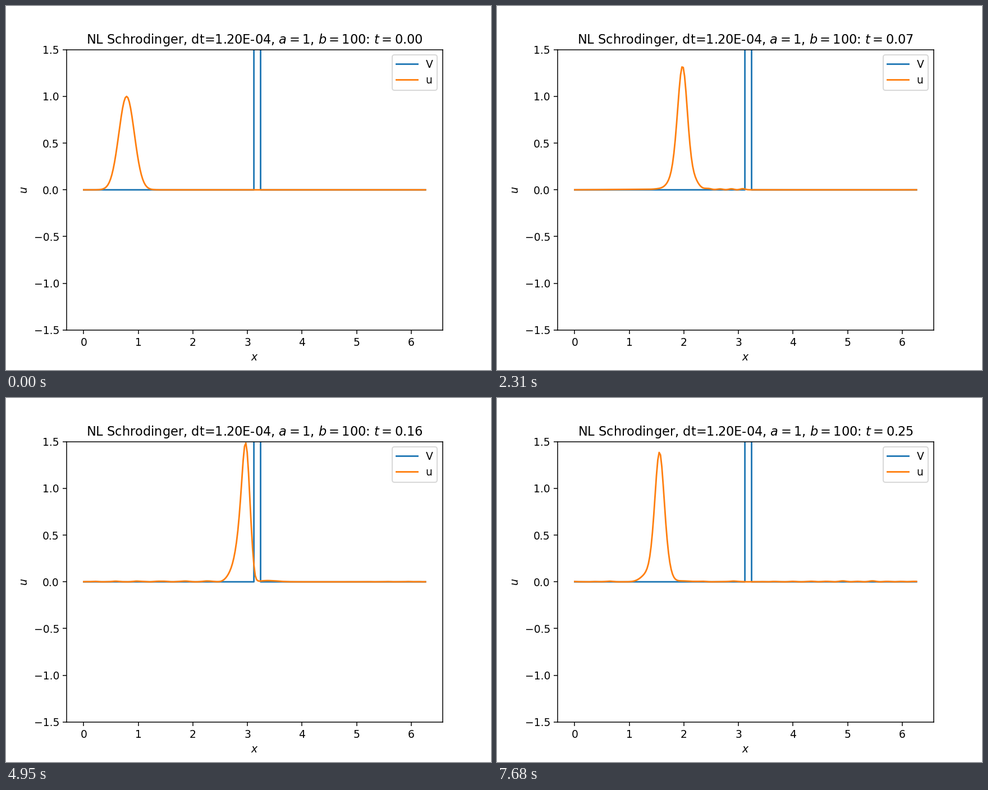
These frames come from a looping animation (864 px wide and 648 px high, 7710 ms). A matplotlib script:

```python
import numpy as np
import matplotlib.pyplot as plt
from matplotlib.animation import FuncAnimation

FRAMES, INTERVAL, STEPS = 257, 30, 8

# Focusing NLS on a periodic grid: i u_t + a u_xx + b |u|^2 u - V u = 0
N = 256
A, B = 1, 100
DX = 2 * np.pi / N
DT = 0.2 * DX**2
x = np.arange(N) * DX
k = np.fft.fftfreq(N, 1 / N)

V = np.zeros(N)
V[N // 2:N // 2 + 4] = 500


def solve():
    """Strang splitting; returns |u|^2 for every frame."""
    drift = np.exp(-1j * A * k**2 * DT)

    def kick(u):
        return u * np.exp(0.5j * DT * (B * abs(u)**2 - V))

    u = np.exp(-(x - np.pi / 4)**2 / (2 * 0.2**2) + 8j * x)
    out = [abs(u)**2]
    for _ in range(FRAMES - 1):
        for _ in range(STEPS):
            u = kick(np.fft.ifft(drift * np.fft.fft(kick(u))))
        out.append(abs(u)**2)
    return out


density = solve()

fig, ax = plt.subplots(figsize=(6.4, 4.8), dpi=135)
ax.plot(x, V, label="V")
wave, = ax.plot(x, density[0], label="u")
ax.set_ylim(-1.5, 1.5)
ax.set_xlabel("$x$")
ax.set_ylabel("$u$")
ax.legend(loc="upper right")
title = ax.set_title("")


def update(i):
    t = i * STEPS * DT
    wave.set_ydata(density[i])
    title.set_text(f"NL Schrodinger, dt={DT:.2E}, $a={A}$, $b={B}$: $t={t:.2f}$")
    return wave, title


anim = FuncAnimation(fig, update, frames=FRAMES, interval=INTERVAL,
                     repeat=True, repeat_delay=0, blit=False)
plt.show()
```
